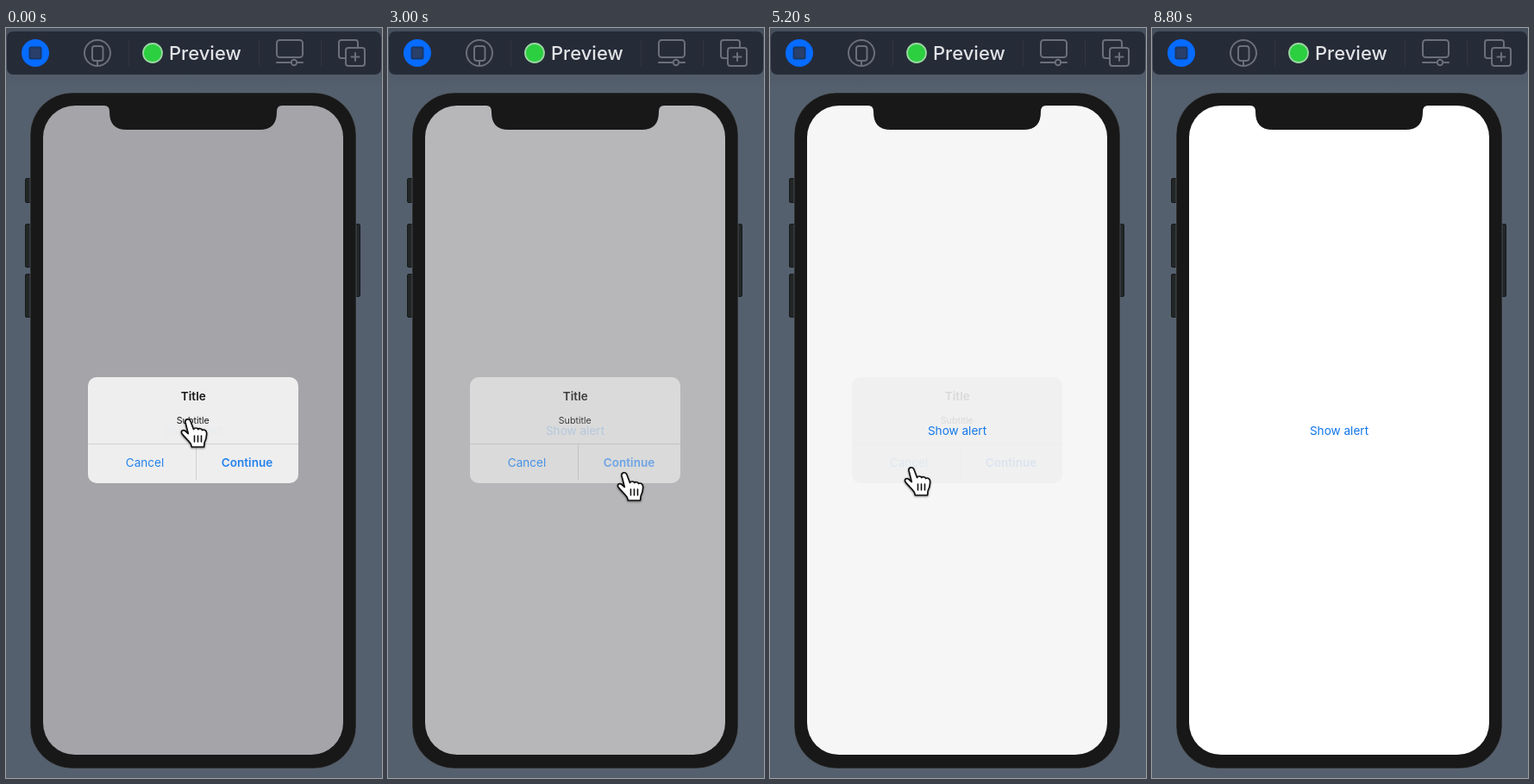
An HTML page that plays this animation: 436 by 870 pixels, repeating every 8.9 s.

```html
<!DOCTYPE html>
<html lang="en">
<head>
<meta charset="utf-8">
<title>Alert preview</title>
<style>
  html, body { margin: 0; width: 100%; height: 100%; overflow: hidden; background: #55606e; }
  svg { display: block; width: 100vw; height: 100vh; }
  text { font-family: Inter, Roboto, sans-serif; }
  .icon { fill: none; stroke: #6a6f7a; stroke-width: 2; stroke-linecap: round; }
  .separator { stroke: #313641; stroke-width: 1; }
  .label { font-size: 13.6px; text-anchor: middle; }
  .blue { fill: #0f76ec; }
  .bold { font-weight: 600; }
  .rule { stroke: #000; stroke-opacity: .14; }
  .hand { fill: #fff; stroke: #111; stroke-width: 1.7; stroke-linejoin: round; stroke-linecap: round;
          filter: drop-shadow(0 1.5px 1.2px rgba(0, 0, 0, .45)); }
</style>
</head>
<body>
<svg viewBox="0 0 436 870">
  <defs>
    <linearGradient id="barShadow" x2="0" y2="1">
      <stop stop-color="#454e5b"/>
      <stop offset="1" stop-color="#55606e"/>
    </linearGradient>
  </defs>

  <rect width="436" height="870" fill="#55606e"/>
  <rect width="436" height="72" fill="url(#barShadow)"/>

  <g id="toolbar">
    <rect x="1" y="4" width="434" height="50" rx="7" fill="#262b38"/>
    <circle cx="34" cy="29" r="16" fill="#066bff"/>
    <rect x="27.5" y="22.5" width="13" height="13" rx="1.5" fill="#2b4069" stroke="#193765" stroke-width="2"/>
    <g class="icon">
      <circle cx="106" cy="29" r="15"/>
      <rect x="100" y="21" width="12.500" height="17" rx="3"/>
      <path d="M106 38v6"/>
      <rect x="314" y="14" width="30" height="20" rx="3.500"/>
      <path d="M314 40h16M338 40h6"/>
      <circle cx="334" cy="40" r="3.200"/>
      <path d="M394 35h-5a3 3 0 0 1-3-3v-15a3 3 0 0 1 3-3h16a3 3 0 0 1 3 3v6"/>
      <rect x="394" y="23" width="22" height="21" rx="3"/>
      <path d="M400.500 33.500h9M405 29v9"/>
    </g>
    <path class="separator" d="M142.500 14v30M293.500 14v30M365.500 14v30"/>
    <circle cx="170" cy="29" r="11" fill="#2bcf40" stroke="#9bd6a2" stroke-width="1.800"/>
    <text x="189" y="37" font-size="22" font-weight="500" fill="#e2e3e6">Preview</text>
  </g>

  <g id="phone">
    <g fill="#222627" stroke="#171a1b">
      <rect x="22.500" y="174.500" width="8" height="28" rx="1.500"/>
      <rect x="22.500" y="227.500" width="8" height="50" rx="1.500"/>
      <rect x="22.500" y="285.500" width="8" height="50" rx="1.500"/>
      <rect x="402.500" y="227.500" width="8" height="84" rx="1.500"/>
    </g>
    <rect x="28" y="75" width="378" height="784" rx="49" fill="#181818" stroke="#626a73" stroke-width=".6"/>
    <rect id="screen" x="43" y="90" width="348" height="753" rx="37"/>
    <path fill="#181818" d="M114 89.500h206v.5q-6 0-6 7c0 14-6 21-20 21H140c-14 0-20-7-20-21q0-7-6-7z"/>
  </g>

  <rect id="card" x="95" y="405" width="244" height="123" rx="10"/>
  <text id="show" class="label blue" x="217" y="471.500">Show alert</text>
  <g id="content">
    <text class="label bold" x="217.300" y="431.500">Title</text>
    <text x="216.800" y="459" font-size="10.700" text-anchor="middle">Subtitle</text>
    <path class="rule" d="M95 482.500h244M220.500 483v41"/>
    <text id="cancel" class="label blue" x="161" y="509">Cancel</text>
    <text id="continue" class="label blue bold" x="279.500" y="509">Continue</text>
  </g>

  <g id="cursor" class="hand">
    <path d="M-3 3.500C-3.700-.8 1.500-1.600 3 2.300L6.500 11.500c1-2 4.300-2 5.300 0 1-1.300 4-1 4.800 1 2-1.200 4.700 0 5 3 .5 5-.8 8-2.500 11.500L18.600 32H4.400L3.300 28.500C0 23.500-4 21-7 16.500c-1.700-3.200 1.500-5 4-3L.3 16.500z"/>
    <path fill="none" stroke-width="1.600" d="M7.500 19v7M11.500 19v7M15.500 19v7"/>
  </g>
</svg>
<script>
  const LOOP = 8900, STEP = 100, FADE = 350;
  const $ = id => document.getElementById(id);
  const clamp = v => Math.min(1, Math.max(0, v));
  const smooth = v => (v = clamp(v), v * v * (3 - 2 * v));

  // Each alert: opening time, closing time, pressed button
  const alerts = [
    [-281, 1064, 'cancel'],
    [1950, 2878, 'continue'],
    [3850, 4915, 'cancel'],
    [5997, 6960, 'continue']
  ];

  // Cursor stops: time, x, y
  const stops = [
    [0, 211, 454], [150, 211, 454], [900, 179, 504], [1300, 179, 504],
    [1850, 211, 472], [2100, 211, 472], [2750, 274, 516], [3050, 274, 516],
    [3700, 210, 476], [4300, 210, 476], [4800, 164, 510], [5250, 164, 510],
    [5850, 212, 476], [6350, 212, 476], [6850, 274, 514], [7300, 274, 514],
    [8100, -40, 560]
  ];

  function cursorAt(t) {
    const i = stops.findIndex(s => s[0] > t);
    if (i < 0) return stops[stops.length - 1].slice(1);
    const [t0, x0, y0] = stops[i - 1], [t1, x1, y1] = stops[i];
    const k = smooth((t - t0) / (t1 - t0));
    return [x0 + (x1 - x0) * k, y0 + (y1 - y0) * k];
  }

  function draw(t) {
    let p = 0;
    const pressed = { cancel: false, continue: false };
    for (const [open, close, button] of alerts) {
      p += smooth((t - open) / FADE) - smooth((t - close) / FADE);
      if (t > close - 80 && t < close + FADE) pressed[button] = true;
    }
    p = clamp(p);
    const shade = 255 - 185 * p * (1 - p);
    $('screen').setAttribute('fill', `rgb(${255 - 100 * p},${255 - 101 * p},${255 - 97 * p})`);
    $('card').setAttribute('fill', `rgb(${shade},${shade},${shade})`);
    $('card').style.opacity = p > 0 ? 1 : 0;
    $('show').style.opacity = Math.cos(p * Math.PI / 2) ** 2;
    $('content').style.opacity = p;
    for (const id in pressed) $(id).style.opacity = pressed[id] ? .75 : 1;
    $('cursor').setAttribute('transform', `translate(${cursorAt(t)})`);
  }

  const start = performance.now();
  function tick() {
    const t = (performance.now() - start) % LOOP;
    draw(Math.floor(t / STEP) * STEP);
    requestAnimationFrame(tick);
  }
  tick();
</script>
</body>
</html>
```
